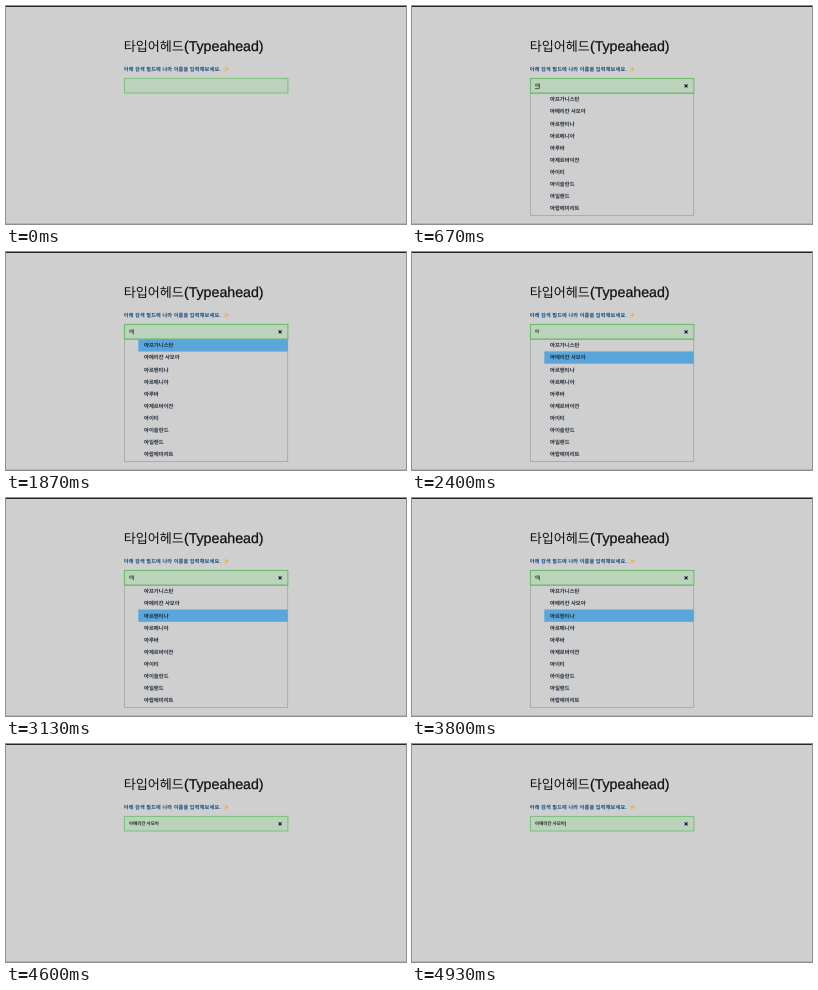
Animation, 400 px wide and 218 px high, one loop 5070 ms. Source, as an HTML page:

```html
<!DOCTYPE html>
<html>
<head>
<meta charset="utf-8">
<title>Typeahead</title>
<style>
  html, body { margin: 0; width: 100%; height: 100%; overflow: hidden; background: #cfcfcf; }
  svg { display: block; width: 400px; height: 218px; }
  text { font-family: "Noto Sans CJK KR", "Noto Sans CJK", "Noto Sans CJK JP", sans-serif; white-space: pre; text-rendering: geometricPrecision; }
  .title { font-size: 13.1px; font-weight: 500; fill: #0c0f14; }
  .latin { font-family: "Liberation Sans", Arial, sans-serif; font-size: 14.2px; font-weight: 400; stroke: #0c0f14; stroke-width: .25; }
  .hint { font-size: 5.15px; font-weight: 700; letter-spacing: .2px; fill: #104a7c; }
  .row { font-size: 5.35px; font-weight: 700; fill: #222e3c; }
  .row .match { font-weight: 900; fill: #101a26; }
  .query { font-size: 4.5px; font-weight: 700; fill: #223022; }
</style>
</head>
<body>
<svg viewBox="0 0 400 218">
  <rect width="400" height="218" fill="#cfcfcf"/>
  <rect width="400" height="1" fill="#262626"/>
  <rect y="217" width="400" height="1" fill="#b4b4b4"/>

  <text class="title" x="117.7" y="45">타입어헤드<tspan class="latin">(Typeahead)</tspan></text>
  <text class="hint" x="117.8" y="64.7">아래 검색 필드에 나라 이름을 입력해보세요.</text>
  <g id="sparkle" fill="#dfb463"></g>

  <g id="list">
    <rect x="118.5" y="87.5" width="163.2" height="122" fill="#cfcfcf" stroke="#9aaaa4" stroke-width=".8"/>
    <rect id="mark" x="132.3" width="149.5" height="12.3" fill="#58a6dc"/>
    <g id="rows"></g>
  </g>

  <rect id="field" x="118.4" y="72.4" width="163.5" height="14.6" fill="#bbd2bb"/>
  <text id="query" class="query" x="123" y="81.3"></text>
  <path id="underline" d="M123 82.6h4.3" stroke="#223022" stroke-width=".7"/>
  <rect id="caret" y="77.4" width=".6" height="5" fill="#223022"/>
  <path id="clear" d="M272.6 78.4l3 3m0-3l-3 3" stroke="#15153f" stroke-width="1.1"/>
</svg>
<script>
  const LOOP = 5070, ROW = 12.1, TOP = 87.3;
  const BLINK = 1000, BLINK_START = 640;
  const countries = ["아프가니스탄", "아메리칸 사모아", "아르헨티나", "아르메니아", "아루바",
    "아제르바이잔", "아이티", "아이슬란드", "아일랜드", "아랍에미리트"];

  // start time, query, list open, highlighted row, composing
  const steps = [
    [0, "", false, -1, false],
    [470, "ㅇ", false, -1, true],
    [600, "아", true, -1, true],
    [1730, "아", true, 0, false],
    [2270, "아", true, 1, false],
    [2870, "아", true, 2, false],
    [3870, "아", true, 1, false],
    [4470, countries[1], false, -1, false]
  ];

  const $ = id => document.getElementById(id);
  const show = (id, on) => $(id).setAttribute("visibility", on ? "inherit" : "hidden");

  const star = (x, y, r) => {
    const k = r * 0.28;
    return `<path d="M${x} ${y - r}l${k} ${r - k} ${r - k} ${k} ${k - r} ${k} ${-k} ${r - k} ${-k} ${k - r} ${k - r} ${-k} ${r - k} ${-k}z"/>`;
  };
  $("sparkle").innerHTML = star(220.6, 63.1, 2.7) + star(218, 61.3, 1.1) + star(218.2, 65, 1.2);

  $("rows").innerHTML = countries.map((name, i) =>
    `<text class="row" x="138" y="${TOP + ROW * i + 8}"><tspan class="match">${name[0]}</tspan>${name.slice(1)}</text>`
  ).join("");

  let current;
  function draw(now) {
    const t = now % LOOP;
    const step = steps.filter(s => s[0] <= t).pop();
    const [, query, open, row, composing] = step;
    if (step !== current) {
      current = step;
      $("query").textContent = query;
      $("field").setAttribute("stroke", open ? "#64bb64" : "#7cbf7c");
      $("mark").setAttribute("y", TOP + ROW * Math.max(row, 0));
      $("caret").setAttribute("x", 123.2 + $("query").getComputedTextLength());
      show("list", open);
      show("mark", row >= 0);
      show("underline", composing);
      show("clear", query);
    }
    const phase = (t - BLINK_START + BLINK) % BLINK;
    show("caret", query && phase < BLINK / 2);
    requestAnimationFrame(draw);
  }
  draw(performance.now());
</script>
</body>
</html>
```
